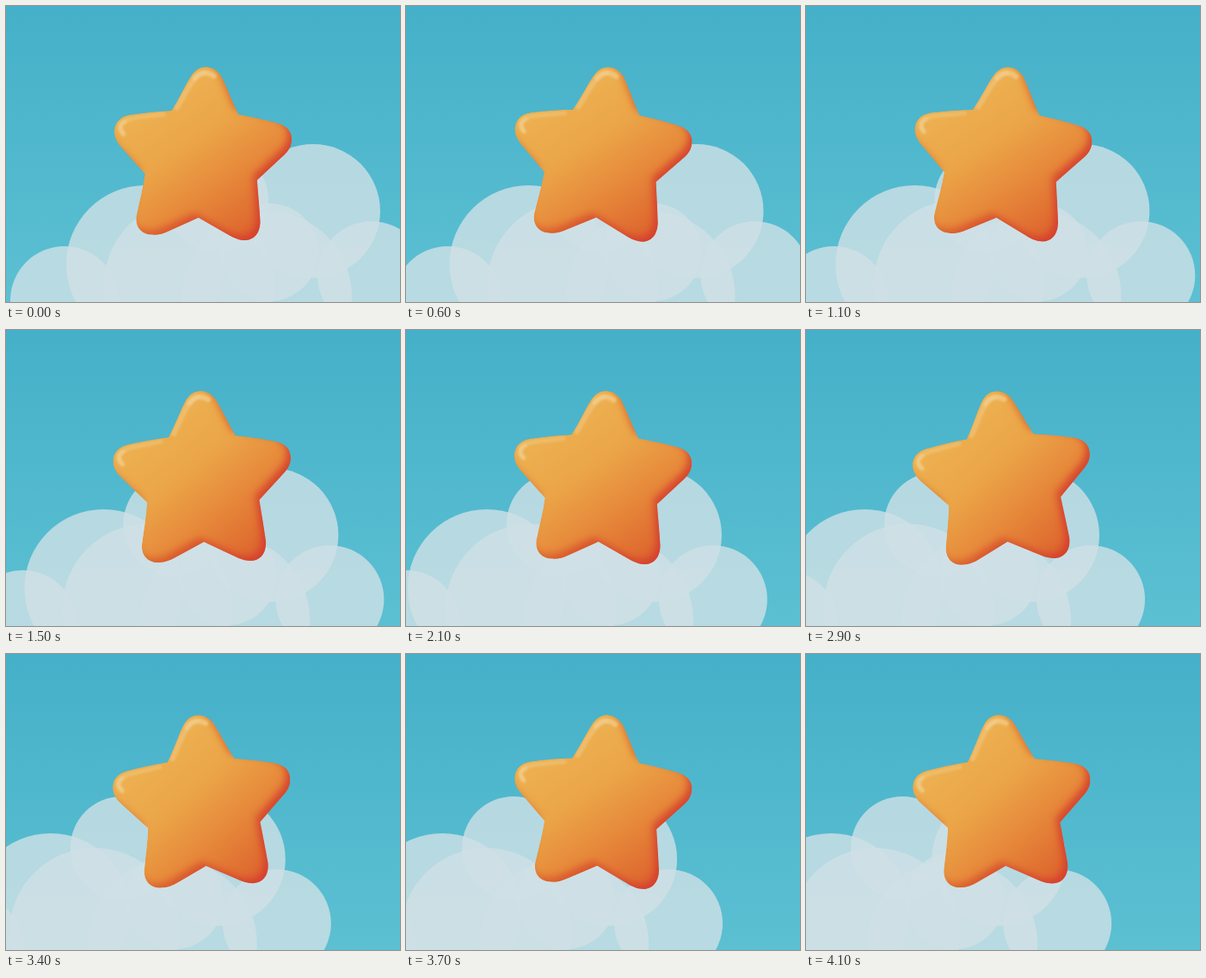
An HTML page that plays this animation: 458 px wide and 345 px high, repeating every 4200 ms.

```html
<!DOCTYPE html>
<html lang="en">
<head>
<meta charset="utf-8">
<title>Star over clouds</title>
<style>
  html, body { margin: 0; width: 100%; height: 100%; overflow: hidden; background: #52b8cd; }
  svg { display: block; width: 458px; height: 345px; }
</style>
</head>
<body>
<svg viewBox="0 0 458 345">
  <defs>
    <linearGradient id="sky" x2="0" y2="1">
      <stop offset="0" stop-color="#45b0c9"/>
      <stop offset="1" stop-color="#5cc0d2"/>
    </linearGradient>
    <linearGradient id="body" gradientUnits="userSpaceOnUse" x1="166" y1="98" x2="292" y2="252">
      <stop offset="0" stop-color="#edb352"/>
      <stop offset=".4" stop-color="#eba548"/>
      <stop offset=".7" stop-color="#e6883a"/>
      <stop offset="1" stop-color="#de682f"/>
    </linearGradient>
    <linearGradient id="shade" gradientUnits="userSpaceOnUse" x1="160" y1="130" x2="300" y2="230">
      <stop offset="0" stop-color="#e08a38"/>
      <stop offset=".45" stop-color="#dc6a2e"/>
      <stop offset="1" stop-color="#d6402f"/>
    </linearGradient>
    <filter id="soft" filterUnits="userSpaceOnUse" x="60" y="20" width="340" height="300">
      <feGaussianBlur stdDeviation="4.5"/>
    </filter>
    <filter id="gloss" filterUnits="userSpaceOnUse" x="60" y="20" width="340" height="300">
      <feGaussianBlur stdDeviation="1.3"/>
    </filter>
    <path id="shape" d="M189 125 C197 110 203 93 208 84 C213 74 220 71 226 71 C234 71 241 76 245 83
      C252 95 259 110 267 123 C283 125 300 127 314 130 C326 133 331 140 331 149 C331 158 326 164 321 169
      L294.5 198 C297 214 300 231 302 246 C303 262 294 269 284 269 C277 269 270 266 264 263
      L230 247 L197 265 C190 269 184 271 177 271 C165 271 157 263 158 250 C160 234 163 218 164 201
      L133 171 C128 166 124.5 160 124.5 153 C124.5 143 131 136 142 133.500 C157 130 173 127 189 125Z"/>
    <path id="outside" fill-rule="evenodd"/>
    <clipPath id="clip"><use href="#shape"/></clipPath>
  </defs>
  <rect width="458" height="345" fill="url(#sky)"/>
  <g id="clouds" fill="#d0e2e6" fill-opacity=".8"></g>
  <g id="star">
    <g clip-path="url(#clip)">
      <use href="#shape" fill="url(#body)"/>
      <g filter="url(#soft)">
        <use href="#outside" x="-5" y="-5" fill="url(#shade)"/>
      </g>
      <g filter="url(#gloss)" fill="none" stroke="#f4d398" stroke-linecap="round">
        <path d="M195 121 C204 103 211 82 223 78" stroke-width="6" opacity=".4"/>
        <path d="M213 85 C219 77 228 76 235 81" stroke-width="6" opacity=".6"/>
        <path d="M136 157 C126 147 134 140 146 137 L180 130" stroke-width="5" opacity=".35"/>
        <path d="M135 156 C129 151 130 145 136 142" stroke-width="5" opacity=".55"/>
      </g>
    </g>
  </g>
</svg>
<script>
  const LOOP = 4200, STEP = 100;
  const DRIFT = 32.4;              // px per second, leftwards
  const SWING = 5.4, TURNS = 8;    // degrees, swings per loop
  const POSE = -1.46;              // tilt the star path is drawn with

  // centre x, centre y, radius
  const puffs = [
    [68, 343, 63], [162, 301, 92], [213, 325, 99], [245, 226, 60],
    [357, 239, 78], [303.5, 338, 98.5], [306, 287, 57], [425, 314, 63]
  ];

  const byId = id => document.getElementById(id);
  const clouds = byId('clouds'), star = byId('star');

  for (const [cx, cy, r] of puffs) {
    const c = document.createElementNS('http://www.w3.org/2000/svg', 'circle');
    Object.entries({ cx, cy, r }).forEach(([k, v]) => c.setAttribute(k, v));
    clouds.append(c);
  }
  byId('outside').setAttribute('d', 'M60 20H400V320H60Z' + byId('shape').getAttribute('d'));

  function draw(ms) {
    const t = Math.floor(ms % LOOP / STEP) * STEP;
    const phase = 2 * Math.PI * TURNS * t / LOOP + 0.707;
    const tilt = SWING * Math.sin(phase) - 0.45;
    clouds.setAttribute('transform', `translate(${-DRIFT * t / 1000} 0)`);
    star.setAttribute('transform', `rotate(${tilt - POSE} 229 167)`);
  }

  const start = performance.now();
  function tick() {
    draw(performance.now() - start);
    requestAnimationFrame(tick);
  }
  tick();
</script>
</body>
</html>
```
